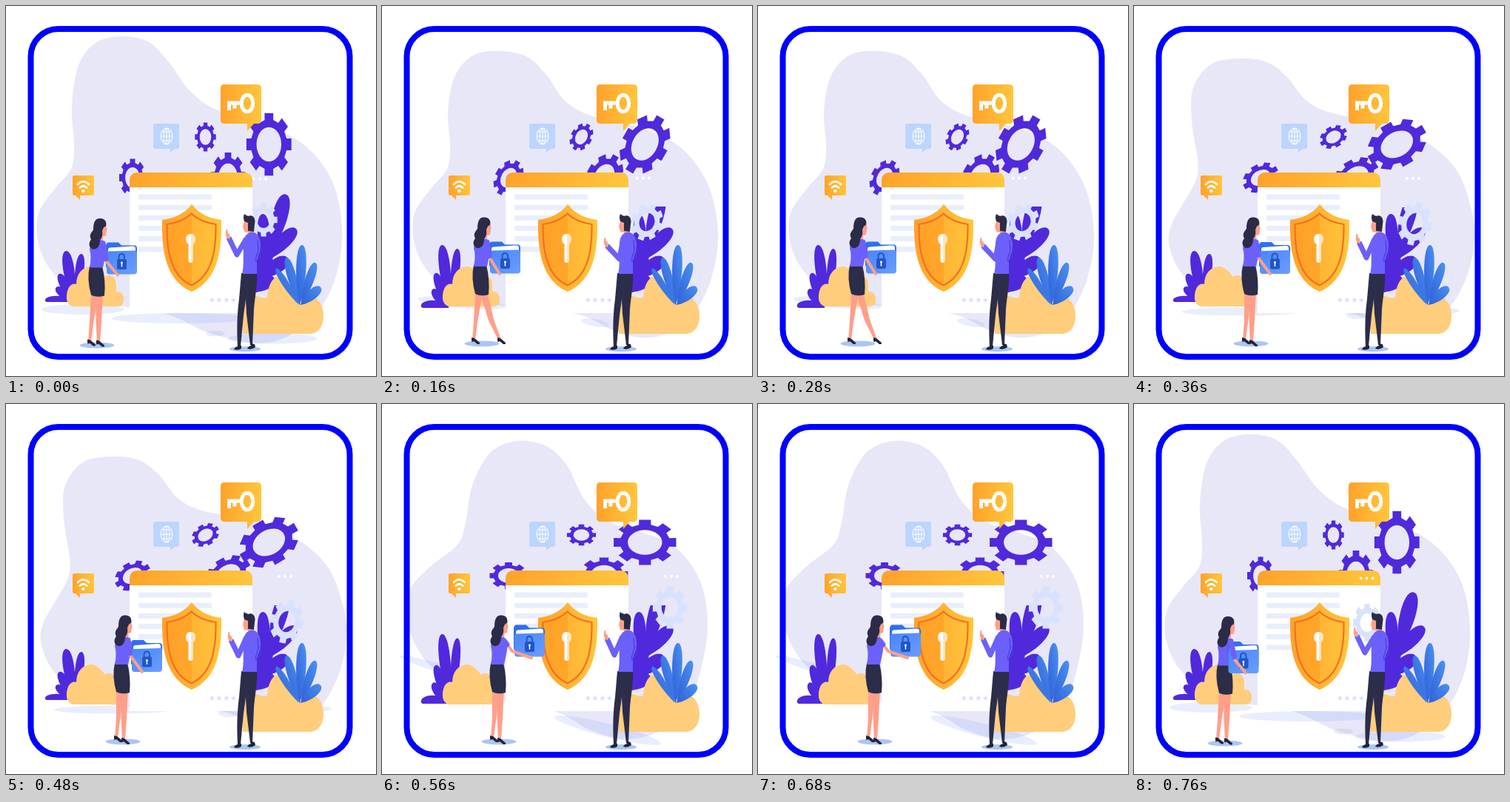
These frames come from a looping animation (500x500 px, 800 ms). An HTML page:

```html
<!DOCTYPE html>
<html lang="en">
<head>
<meta charset="utf-8">
<title>Data security</title>
<style>
html, body { margin: 0; width: 100%; height: 100%; overflow: hidden; background: #fff; }
svg { display: block; width: 100vw; height: 100vh; }
</style>
</head>
<body>
<svg viewBox="0 0 500 500">
  <defs>
    <linearGradient id="gold"><stop stop-color="#ffa22b"/><stop offset="1" stop-color="#ffc63c"/></linearGradient>
    <linearGradient id="leafBlue" x1="0" y1="1" x2="1" y2="0"><stop stop-color="#2f5fd6"/><stop offset="1" stop-color="#4a90f2"/></linearGradient>
    <linearGradient id="front" x1="0" y1="0" x2="1" y2="1"><stop stop-color="#4a86f8"/><stop offset="1" stop-color="#6a9dfd"/></linearGradient>
    <clipPath id="topCut"><rect id="cut" x="300" y="0" width="140" height="500"/></clipPath>
  </defs>
  <path id="blob" fill="#e8e7f8"/>
  <g id="ground" fill="#5b86ec" fill-opacity=".14"></g>
  <g id="gears" fill="#5029dc"></g>

  <g id="bubbles" fill="url(#gold)">
    <path d="M295 106H340Q345 106 345 111V154Q345 159 340 159H335L326 169V159H295Q290 159 290 154V111Q290 106 295 106Z"/>
    <path d="M92 229H117Q119 229 119 231V254Q119 256 117 256H100V262L94 256H92Q90 256 90 254V231Q90 229 92 229Z"/>
    <path fill="#bcd5fd" d="M202 159H231Q234 159 234 162V190Q234 193 231 193H228L222 198V193H202Q199 193 199 190V162Q199 159 202 159Z"/>
  </g>
  <g fill="none" stroke="#fff">
    <ellipse cx="326" cy="131.5" rx="7.8" ry="11.3" stroke-width="5"/>
    <path stroke-width="5" d="M318 131H299M301.500 130V141M309 130V138.500"/>
    <path stroke-width="2.600" stroke-linecap="round" d="M97 241Q104 233.500 112 241M100 245.500Q104.500 241 109 245.500"/>
    <g stroke-width="1">
      <ellipse cx="217" cy="176" rx="8" ry="11"/>
      <ellipse cx="217" cy="176" rx="4" ry="11"/>
      <path d="M217 165V187M209 176H225M210.500 170H223.500M210.500 182H223.500"/>
    </g>
  </g>
  <circle cx="104.300" cy="250" r="2.300" fill="#fff"/>

  <path fill="#fff" d="M167 240H333V415H167Z"/>
  <path fill="url(#gold)" d="M167 245V237Q167 225 178 225H322Q333 225 333 237V245Z"/>
  <g id="lines" fill="#e9eefd"></g>
  <g id="stars" fill="#d9e1fc"></g>
  <g id="dots" fill="#fff">
    <ellipse cx="-8" rx="1.800" ry="2"/><ellipse rx="1.800" ry="2"/><ellipse cx="8" rx="1.800" ry="2"/>
  </g>

  <path fill="url(#gold)" d="M251 268C241 281 227 287 211 289C210 331 216 371 251 386C286 371 292 331 291 289C275 287 261 281 251 268Z"/>
  <path fill="#ffa126" fill-opacity=".7" d="M251 281C242 290 230 294 217 296C217 332 224 365 251 377Z"/>
  <path fill="none" stroke="#f4701f" stroke-width="2.200" d="M250.500 280.500C242 289 230 293 217.500 295C217 332 223 365 250.500 377.500C278 365 284 332 283.500 295C271 293 259 289 250.500 280.500Z"/>
  <path fill="#fff" d="M246.500 322C241.500 319 241.500 308 249.500 308C257.500 308 257.500 319 252.500 322V344Q252.500 347 249.500 347Q246.500 347 246.500 344Z"/>
  <path fill="#ffe5c0" d="M250 308.300C257.500 309 257.200 319 252.500 322V344Q252.500 347 250 347Z"/>

  <g fill="#5029dc">
    <g id="topLeaf" clip-path="url(#topCut)"></g>
    <g id="shrub"></g>
  </g>
  <path id="paleGear" fill="#d9e2fd" fill-rule="evenodd"/>

  <path fill="#ffcd7b" d="M320 443V393Q330 387 342 393Q349 396 353 394C354 378 360 366 369 365C380 365 385 379 389 394L401 404Q405 394 415 394C424 396 429 407 429 419C429 433 422 443 410 443Z"/>
  <g id="bluePlant" fill="url(#leafBlue)"></g>
  <g id="leftPlant" fill="#5029dc"></g>
  <path fill="#ffcd7b" d="M92 406C85 406 81 399 82 391C83 379 89 374 95 376C95 361 104 353 114 352C123 352 129 360 134 366C141 361 149 366 149 377V386C156 385 160 391 159 398Q158 406 151 406Z"/>

  <ellipse cx="323" cy="463.500" rx="21" ry="3.600" fill="#a9c6f6"/>
  <g id="man">
    <path fill="#2b2d49" d="M318 361H339C340 378 336 394 335 410L333 458H330L325 416L324 396L321 418L317 460H313C312 438 312 418 315 396Z"/>
    <path fill="#3a3d61" d="M327 374L325 395L326 418L324 398Z"/>
    <path fill="#22233a" d="M313 458L318 459V463Q314 466 308 464Q309 461 313 460ZM330 456L336 457L337 461Q332 465 326 463Q327 460 331 459Z"/>
    <path fill="#ff9f8a" d="M322 290L320 298L322 305L327 306V312L335 309V292Z"/>
    <path fill="#2b2b47" d="M322 291Q320 285 322 281Q326 285 331 283Q338 285 336 295L335 305L327 304V293Z"/>
    <path fill="#6c60fa" d="M326 308Q333 303 339 308Q345 315 344 329L339 344V362H319C322 350 320 336 321 326Q320 313 326 308Z"/>
    <path fill="none" stroke="#4c3ed4" stroke-width="1.200" d="M340 316L341 330L337 343M344 326V339L337 346"/>
    <polyline id="manArm" fill="none" stroke="#6c60fa" stroke-width="7" stroke-linejoin="round"/>
    <path id="manHand" fill="#ff9f8a" d="M-2-8Q0-9 0-4L3-1L3 5L-1 4Q-4-1-2-8Z"/>
  </g>

  <ellipse id="womanShade" rx="23.500" ry="3.900" fill="#a9c6f6"/>
  <g id="woman">
    <g id="legs" fill="#ff9f8a"></g>
    <g fill="#22233a">
      <path id="shoeA" d="M-4-3L0-2L7 4Q8 6 4 6L-1 2L-3 3L-3 1L-4 4Z"/>
      <path id="shoeB" d="M-4-3L0-2L7 4Q8 6 4 6L-1 2L-3 3L-3 1L-4 4Z"/>
    </g>
    <path fill="#2b2d49" d="M147 350H164Q169 370 167 390Q157 393 149 389Q143 368 147 350Z"/>
    <path fill="#ff9f8a" d="M164 292L169 294L170.500 300L169 309L165 310V317L157 316V300Z"/>
    <path fill="#6c60fa" d="M153 317Q161 312 167 317Q171 325 168 338L165 352H147Q150 338 147 327Q148 320 153 317Z"/>
    <path fill="#2b2b47" d="M160 285.500C167 285 171 290 169 296Q165 297 164 303C165 309 163 312 161 315C161 323 157 328 151 327C146 325 145 319 149 314C146 308 149 305 152 301C152 292 154 286 160 285.500Z"/>
  </g>
  <g id="folder">
    <path fill="#2f6ff0" d="M169 324Q169 319 173 319H186L190 323H207Q211 323 211 327V352H169Z"/>
    <path fill="#fff" d="M172 329Q172 326 175 326L205 324Q209 324 209 327V342H172Z"/>
    <path fill="url(#front)" d="M170 333Q170 331 173 331L208 330Q211 330 211 333V358Q211 362 207 362H174Q170 362 170 358Z"/>
    <path fill="none" stroke="#2156c9" stroke-width="2" d="M186.500 343V339Q186.500 334.500 190.300 334.500Q194 334.500 194 339V343"/>
    <rect x="184" y="341.500" width="13" height="14" rx="2" fill="#2156c9"/>
    <path fill="#fff" d="M189.700 348Q188 346 190.300 344.800Q193 346 191.200 348V352H189.700Z"/>
  </g>
  <g id="arm" fill="none" stroke-linecap="round" stroke-linejoin="round">
    <polyline id="skin" stroke="#ff9f8a" stroke-width="4"/>
    <polyline id="sleeve" stroke="#6c60fa" stroke-width="7"/>
  </g>

  <rect x="33.500" y="31" width="431" height="443" rx="37" fill="none" stroke="#00f" stroke-width="8"/>
</svg>
<script>
const $ = id => document.getElementById(id);
const set = (id, name, value) => $(id).setAttribute(name, value);
const move = (id, x, y) => set(id, 'transform', `translate(${x} ${y})`);
const path = d => `<path d="${d}"/>`;
const fix = n => n.toFixed(1);

// Round-tipped leaf from a base to a tip
function leaf(x0, y0, x1, y1, w) {
  const dx = x1 - x0, dy = y1 - y0, len = Math.hypot(dx, dy);
  const nx = -dy / len * w, ny = dx / len * w;
  const mx = x0 + dx * .4, my = y0 + dy * .4;
  return path(`M${x0} ${y0}C${fix(mx + nx)} ${fix(my + ny)} ${fix(x1 + nx)} ${fix(y1 + ny)} ${x1} ${y1}` +
    `C${fix(x1 - nx)} ${fix(y1 - ny)} ${fix(mx - nx)} ${fix(my - ny)} ${x0} ${y0}Z`);
}

// Unit cog with eight teeth, squashed into an ellipse
function cog(rx, ry, hole = .54) {
  let d = '';
  for (let i = 0; i < 8; i++) {
    for (const [off, r] of [[-.24, .79], [-.19, 1], [.19, 1], [.24, .79]]) {
      const a = i * Math.PI / 4 + off;
      d += `${d ? 'L' : 'M'}${fix(Math.sin(a) * r * rx)} ${fix(-Math.cos(a) * r * ry)}`;
    }
  }
  const hx = rx * hole, hy = ry * hole;
  return `${d}ZM${-hx} 0A${hx} ${hy} 0 1 0 ${hx} 0A${hx} ${hy} 0 1 0 ${-hx} 0Z`;
}

// Closed smooth curve through points
function smooth(text) {
  const p = text.split(' ').map(s => s.split(',').map(Number)), n = p.length;
  let d = `M${p[0]}`;
  p.forEach((b, i) => {
    const a = p[(i + n - 1) % n], c = p[(i + 1) % n], e = p[(i + 2) % n];
    d += `C${[0, 1].map(k => fix(b[k] + (c[k] - a[k]) / 6))} ${[0, 1].map(k => fix(c[k] - (e[k] - b[k]) / 6))} ${c}`;
  });
  return d + 'Z';
}

const wheels = [[355.3, 187, 31, 43], [269.5, 177, 14.5, 20], [171, 232, 18.3, 26], [300, 230.5, 23.5, 33]];
$('gears').innerHTML = wheels.map(w => `<path fill-rule="evenodd" d="${cog(w[2], w[3])}"/>`).join('');

$('lines').innerHTML = [0, 1, 2, 3, 4, 5].map(i =>
  `<rect x="179" y="${254.5 + i * 14.15}" width="${i < 2 ? 99 : 60}" height="7" rx="1"/>`).join('');

const star = [...Array(10)].map((_, i) => {
  const a = i * Math.PI / 5, r = i % 2 ? 1.7 : 4;
  return `${fix(Math.sin(a) * r)},${fix(-Math.cos(a) * r)}`;
}).join(' ');
$('stars').innerHTML = [278.5, 288, 297.7, 307.5].map(x =>
  `<polygon points="${star}" transform="translate(${x} 397.5)"/>`).join('');

$('topLeaf').innerHTML = leaf(357, 333, 378, 254.5, 14);
$('shrub').innerHTML = leaf(350, 350, 347, 281, 11) + leaf(346, 346, 392, 301, 13) +
  leaf(341, 368, 381, 341, 13) + leaf(336, 386, 362, 367, 11) +
  path('M333 386L338 340Q345 325 353 316L364 312L360 345L348 374L340 387Z');
$('bluePlant').innerHTML = leaf(396, 404, 365, 355, 6) + leaf(397, 404, 379, 340, 8) +
  leaf(397, 404, 400, 323, 9) + leaf(399, 403, 418, 347, 8) + leaf(398, 404, 425, 380, 9);
$('leftPlant').innerHTML = leaf(91, 398, 81, 331, 10) + leaf(95, 396, 102, 335, 8) +
  leaf(89, 400, 72, 362, 8) + leaf(87, 400, 68, 380, 7) + path('M90 400H55Q51 399 54 395Q66 388 90 396Z');

const home = {
  blob: smooth('155,41 192,48 220,76 248,114 284,140 345,158 402,187 440,235 454,300 446,365 418,418 375,449 330,455 270,440 213,415 110,397 65,362 44,322 44,280 66,247 88,220 92,188 89,135 98,80 121,50'),
  ground: [[104, 410, 56, 7, 0], [235, 422, 93, 7, 0], [360, 449.5, 61, 7, 0], [283, 442.5, 13, 4, 0]],
  pale: [348, 289, 19, 23, 0], dots: [343, 233.5], cut: 0, plant: [331, 400],
  body: [-34, 1.5], shade: [123, 458.5], folder: [-34, .5],
  feet: [[148, 452], [160, 453]], arm: [[165, 319], [170, 344], [185, 362]],
  man: [[325, 314], [312, 336], [301, 313]]
};
const walk = {
  ...home,
  blob: smooth('155,60.5 195,68 223,94 247,128 284,149 345,163 402,190 440,240 454,305 446,365 422,415 390,441 350,448 310,437 257,415 110,397 65,362 44,322 44,280 66,247 88,220 92,188 89,143 98,96 121,68'),
  ground: [[108, 401, 60, 7, 5], [288, 428, 19, 5, 10]],
  pale: [358, 292, 21.5, 26, 20], dots: [353, 232.5], cut: 271, plant: [323, 408],
  body: [-23, 0], shade: [135, 456.3], folder: [-24, -.5],
  feet: [[148, 451], [183, 451]], arm: [[165, 319], [169, 341], [182, 362]],
  man: [[325, 319], [321, 342], [304, 324]]
};
const stand = {
  ...home,
  blob: smooth('145,71 180,76 207,96 232,127 265,144 335,158 395,184 436,222 456,275 460,315 450,365 425,410 395,432 355,432 310,421 280,415 120,403 70,368 49,330 49,300 67,266 84,235 86,208 78,155 80,110 105,78'),
  ground: [[145, 413, 81, 5.5, 0], [364, 412, 76, 7, 0], [300, 419, 13, 4, 4]],
  pale: [379.5, 294, 23, 30, 12], dots: [377, 233], cut: 272,
  body: [0, 0], shade: [158, 456.3], folder: [0, 0],
  feet: [[150, 451], [160, 454]], arm: [[165, 319], [168, 340], [184, 362]],
  man: [[325, 315], [314, 340], [304, 319]]
};
const lift = {
  ...stand,
  blob: smooth('182,50 222,57 250,83 273,128 305,158 350,173 395,192 428,235 440,290 434,345 415,405 380,440 330,453 280,440 232,415 120,390 70,358 45,325 33,285 38,250 65,220 102,190 113,160 122,110 146,66'),
  ground: [[84, 359, 63, 6, 17], [305, 441, 74, 9, 14]],
  pale: [389, 275, 23.5, 29, 0], dots: [391, 233], plant: [311, 405], folder: [9, -20.5],
  arm: [[165, 320], [176, 334], [202, 343]], man: [[325, 314], [314, 339], [304, 317]]
};
const back = { ...home, pale: [315, 295.5, 19.5, 26, 0], dots: [314.5, 235.5], folder: [-42.5, 2] };

const steps = [[0, home], [160, walk], [360, stand], [560, lift], [760, back]];

function draw(i) {
  const p = steps[i][1];
  set('blob', 'd', p.blob);
  $('ground').innerHTML = p.ground.map(([x, y, rx, ry, a]) =>
    `<ellipse rx="${rx}" ry="${ry}" transform="translate(${x} ${y}) rotate(${a})"/>`).join('');
  wheels.forEach(([x, y], k) =>
    $('gears').children[k].setAttribute('transform', `translate(${x} ${y}) rotate(${i % 4 * 30})`));

  const [x, y, rx, ry, turn] = p.pale;
  set('paleGear', 'd', cog(rx, ry, .48));
  set('paleGear', 'transform', `translate(${x} ${y}) rotate(${turn})`);
  move('dots', ...p.dots);
  set('cut', 'y', p.cut);

  const [top, base] = p.plant, s = (base - top) / 69;
  set('leftPlant', 'transform', `translate(0 ${base - 400 * s}) scale(1 ${s})`);

  move('woman', ...p.body);
  move('womanShade', ...p.shade);
  move('folder', ...p.folder);
  const [a, b] = p.feet;
  $('legs').innerHTML = path(`M149 386H159L${a[0] + 4} 428L${a[0] + 1} ${a[1]}H${a[0] - 3}L${a[0] - 1} 425Z`) +
    path(`M155 386H165L${(b[0] + 166) / 2} 425L${b[0] + 1} ${b[1]}H${b[0] - 3}L${(b[0] + 151) / 2} 425Z`);
  move('shoeA', ...a);
  move('shoeB', ...b);

  move('arm', ...p.body);
  const [shoulder, elbow, hand] = p.arm;
  set('skin', 'points', p.arm.join(' '));
  const cuff = shoulder.map((v, k) => v + (elbow[k] - v) * (i === 3 ? .35 : .85));
  set('sleeve', 'points', `${shoulder} ${cuff}`);

  set('manArm', 'points', p.man.join(' '));
  const wrist = p.man[2];
  move('manHand', wrist[0] - 1.5, wrist[1] - 3);
}

const start = performance.now();
let shown = -1;
function tick() {
  const t = (performance.now() - start) % 800;
  const i = steps.filter(s => s[0] <= t).length - 1;
  if (i !== shown) draw(shown = i);
  requestAnimationFrame(tick);
}
tick();
</script>
</body>
</html>
```
